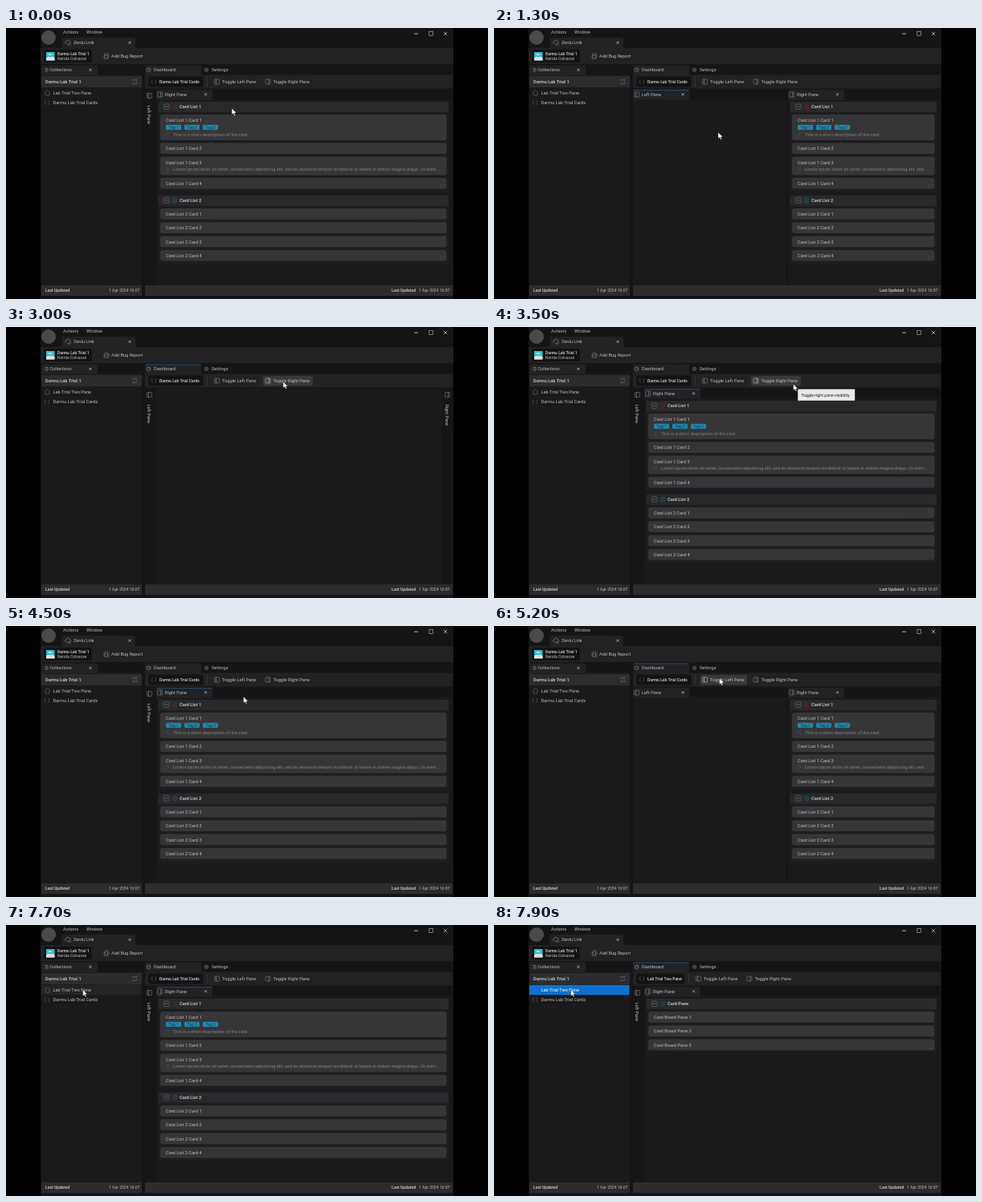
An HTML page for the animation above (8000 ms loop, 600 by 338 pixels).

```html
<!DOCTYPE html>
<html lang="en">
<head>
<meta charset="utf-8">
<title>Pane toggles</title>
<style>
  html, body { margin: 0; width: 100%; height: 100%; overflow: hidden; background: #000; }
  svg { display: block; width: 100vw; height: 100vh; }
  text { font-family: Roboto, "Liberation Sans", sans-serif; white-space: pre; }
</style>
</head>
<body>
<svg id="stage" viewBox="0 0 600 338"></svg>
<script>
const LOOP = 8000, STEP = 100;
const stage = document.getElementById('stage');
const C = {
  frame: '#151516', bar: '#222224', body: '#1a191b', head: '#2c2c2e', card: '#363638',
  hover: '#39393b', ink: '#bcbcbc', dim: '#828284', icon: '#7c7c7e', faint: '#4c4c4e',
  field: '#131314', blue: '#0f70d0', focus: '#20527e'
};
const PROJECT = 'Darmu Lab Trial 1', CARDS = 'Darmu Lab Trial Cards', TWO_PANE = 'Lab Trial Two Pane';
const LOREM = 'Lorem ipsum dolor sit amet, consectetur adipiscing elit, sed';

// [time, layout, focused tab]
const STATES = [
  [0, 'right', ''], [300, 'both', 'dashboard'], [600, 'both', 'left'], [2500, 'right', ''],
  [2900, 'none', 'dashboard'], [3100, 'right', 'dashboard'], [3200, 'right', 'right'],
  [4800, 'both', 'dashboard'], [5400, 'right', ''],
  [6700, 'folded', 'right'], [7000, 'right', 'right'], [7900, 'board', 'dashboard']
];
// [time, x, y] of the pointer tip
const PATH = [
  [0, 281, 100], [200, 283, 68], [300, 283, 68], [500, 270, 190], [800, 262, 288], [900, 262, 284],
  [1000, 258, 270], [1200, 212, 150], [1400, 346, 110], [1600, 310, 46], [1800, 288.5, 67],
  [2500, 288.5, 67], [2800, 345, 68], [3100, 345, 68], [3200, 372, 110], [3400, 372.5, 71],
  [3700, 372.5, 71], [3900, 470, 150], [4100, 542, 222], [4400, 310, 110], [4600, 281, 66],
  [5200, 280.5, 65], [5400, 280.5, 65], [5700, 346, 150], [5900, 300, 208], [6200, 140, 120],
  [6400, 88, 84], [6700, 199, 97], [7000, 199, 97], [7400, 95.5, 80.5], [8000, 95.5, 80.5]
];

const rect = (x, y, w, h, fill, r = 0, stroke = 'none') =>
  `<rect x="${x}" y="${y}" width="${w}" height="${h}" rx="${r}" fill="${fill}" stroke="${stroke}" stroke-width=".6"/>`;
const line = (d, color = C.icon, w = .8) =>
  `<path d="${d}" fill="none" stroke="${color}" stroke-width="${w}"/>`;
const circle = (x, y, r, fill, stroke = 'none') =>
  `<circle cx="${x}" cy="${y}" r="${r}" fill="${fill}" stroke="${stroke}" stroke-width=".8"/>`;
// y is the middle of the line
const label = (s, x, y, { size = 5.65, color = C.ink, bold = false } = {}) =>
  `<text x="${x}" y="${y + 2}" font-size="${size}" fill="${color}" font-weight="${bold ? 700 : 400}">${s}</text>`;
const cross = (x, y, r = 1.4) =>
  line(`M${x - r} ${y - r}l${2 * r} ${2 * r}m0 ${-2 * r}l${-2 * r} ${2 * r}`, C.ink, .8);
const paneIcon = (x, y, split, color = C.icon) =>
  rect(x, y - 3, 6, 6, 'none', .7, color) + line(`M${x + split} ${y - 3}v6`, color);
const rowIcon = (x, y) => line(`M${x - 1} ${y - 2}h-1.5v4h1.5m2 -4h1.5v4h-1.5`, C.faint, .7);

function at(time) {
  const i = PATH.findIndex(p => p[0] > time);
  const [a, x0, y0] = PATH[i - 1], [b, x1, y1] = PATH[i];
  const u = (time - a) / (b - a), e = u * u * (3 - 2 * u);
  return { x: x0 + (x1 - x0) * e, y: y0 + (y1 - y0) * e };
}

function tab(name, x, y, focused, icon) {
  return rect(x, y, 70, 12.5, C.bar, 1.5) + icon + label(name, x + 11, y + 5.8)
    + (focused ? rect(x + .5, y, 69, .9, C.focus) : '');
}

function titleBar() {
  return rect(43, 0, 514, 338, C.frame) + circle(53, 12, 9, '#4a4a4a')
    + label('Actions', 71, 4.8) + label('Window', 100, 4.8)
    + rect(69.5, 12, 91.5, 14, C.bar, 2) + rect(43, 25, 514, 20, C.bar)
    + line('M74 20v-3l3-2 3 2v4h-3v-2') + label('Zenlu Link', 84, 18.3) + cross(154, 18.3)
    + line('M508 7.2h5', C.ink, .9) + rect(526.8, 4.6, 4.8, 4.8, 'none', 0, C.ink) + cross(547, 7, 2.2)
    + rect(47, 27, 60, 16, C.field, 2)
    + rect(50, 30, 10.5, 10.5, '#35bccb') + '<path d="M50 40.5v-3q3-3 5-1l3-1 2.5 2v3z" fill="#e5ded8"/>'
    + rect(52.5, 32, 5, 2, '#9be7e8', 1)
    + label(PROJECT, 64, 31.8, { size: 5, bold: true }) + label('Nerida Colvasse', 64, 38, { size: 5 })
    + `<ellipse cx="125" cy="35.5" rx="1.8" ry="2.8" fill="none" stroke="${C.icon}" stroke-width=".8"/>`
    + line('M121.5 33.5l2 .8m3 0l2-.8M121 36h2m4 0h2M122 39l1.5-1m3 0l1.5 1M124 32l-1-1m3 1l1-1')
    + label('Add Bug Report', 131, 35);
}

function footer(x, w, textX, dateX) {
  return rect(x, 321, w, 13, C.head) + label('Last Updated', textX, 327, { size: 5.05, bold: true })
    + label('1 Apr 2024 16:07', dateX, 327, { size: 5.05 });
}

function collections(p, selected) {
  const row = (name, y, chosen) => {
    const over = p.x > 44 && p.x < 168 && Math.abs(p.y - y) < 6;
    const fill = chosen ? C.blue : over ? '#242426' : 'none';
    return rect(44, y - 6.2, 124.5, 12.4, fill) + label(name, 58.5, y, { color: chosen ? '#fff' : C.ink });
  };
  return rect(44, 58, 125, 263, C.body) + rect(44, 46.5, 70, 12.5, C.bar, 1.5)
    + line('M48.5 50.5h4m-4 1.8h5m-5 1.8h4') + label('Collections', 54.5, 52.3, { size: 5.5 }) + cross(105, 52.3)
    + rect(44, 60, 125, 14, C.head) + label(PROJECT, 49, 67, { bold: true })
    + line('M157.5 66v-1.2h5M163 67.5v1.8h-5M161.5 63.3l1.5 1.5-1.5 1.5M159 67.8l-1.5 1.5 1.5 1.5', '#69696b', .7)
    + row(TWO_PANE, 81, selected) + row(CARDS, 93.2, false)
    + (selected ? '' : line('M49 80v4h5v-4m-5.5 0l3-2.5 3 2.5', '#606062', .7)) + rowIcon(51, 93.2)
    + footer(44, 125, 49, 128);
}

function toolbar(p, board, focus) {
  const dx = board ? -8 : 0;
  const button = (name, x, w, split) => {
    const over = p.y > 60 && p.y < 73.5 && p.x > x && p.x < x + w;
    return (over ? rect(x, 61, w, 12.5, C.hover, 2) : '')
      + paneIcon(x + 3, 67, split, over ? C.ink : C.icon) + label(name, x + 12.5, 67);
  };
  return tab('Dashboard', 173, 46.5, focus === 'dashboard',
      circle(177.5, 52.3, 2.2, 'none', C.icon) + line('M177.5 52.3l1.5-1.5'))
    + circle(249.5, 52.3, 2, 'none', C.icon) + circle(249.5, 52.3, .7, C.icon) + label('Settings', 256, 52.3)
    + rect(173, 58.5, 383, 17, C.bar)
    + rect(177.5, 60.5, 68 + dx, 13, C.field, 2) + rowIcon(184, 67)
    + label(board ? TWO_PANE : CARDS, 191, 67, { size: 5, bold: true })
    + line(`M${250.5 + dx} 61v12`, '#3b3b3d', .7)
    + button('Toggle Left Pane', 256.5 + dx, 58.5, 2) + button('Toggle Right Pane', 320 + dx, 62, 4);
}

function sidebar(name, x, split) {
  return rect(x - 5, 77, 13, 244, '#161617') + paneIcon(x - 2.5, 84.5, split)
    + `<g transform="translate(${x},96.5) rotate(90)">${label(name, 0, 0, { size: 5.5 })}</g>`;
}

function listHead(name, x, y, color, folded) {
  return rect(x, y, 551 - x, 13, '#29292b')
    + rect(x + 6.5, y + 3, 6.5, 6.5, 'none', 1, '#6c6c6e')
    + line(`M${x + 8} ${y + 6.2}h3.5` + (folded ? 'm-1.75-1.75v3.5' : ''), C.dim, .7)
    + rect(x + 18, y + 3.9, 4.5, 4.8, 'none', .5, color) + line(`M${x + 19} ${y + 5.5}h2.5m-2.5 1.7h2.5`, color, .5)
    + label(name, x + 26, y + 6.3, { bold: true });
}

function card(name, x, y, h = 13.7, note = '') {
  const noteIcon = line(`M${x + 9} ${y + h - 9.2}h4m-4 1.8h4m-4 1.8h4`, C.faint, .6);
  return rect(x + 2, y, 546.4 - x, h, C.card, 2.5) + label(name, x + 9, y + 7)
    + (note ? noteIcon + label(note, x + 18, y + h - 7.3, { size: 5.6, color: C.dim }) : '');
}

const tags = (x, y) => [1, 2, 3].map((n, i) =>
  rect(x + 9 + i * 23, y, 19, 6.2, '#2086ab', 1.3)
  + label('Tag ' + n, x + 12.5 + i * 23, y + 3.1, { size: 5, color: '#123d4e' })).join('');

function rightPane(x, layout, focus) {
  const wide = layout !== 'both', folded = layout === 'folded', left = x + 3;
  let out = rect(x, 89, 556 - x, 232, C.body)
    + tab('Right Pane', x, 77, focus === 'right', paneIcon(x + 1.7, 83, 4)) + cross(x + 61.5, 82.8);
  if (layout === 'board') {
    out += rect(left, 92, 551 - left, 66, '#1e1d1f') + listHead('Card Pane', left, 92, '#1a5f70');
    return out + [1, 2, 3].map(n => card('Card Board Pane ' + n, left, 90.7 + 17.3 * n)).join('');
  }
  out += rect(left, 92, 551 - left, folded ? 13 : 112, '#1e1d1f')
    + listHead('Card List 1', left, 92, '#7c2129', folded);
  if (!folded) {
    const more = wide ? ' do eiusmod tempor incididunt ut labore et dolore magna aliqua. Ut enim...' : '...';
    out += card('Card List 1 Card 1', left, 108, 32, 'This is a short description of the card')
      + tags(left, 120.7) + card('Card List 1 Card 2', left, 143.3)
      + card('Card List 1 Card 3', left, 160.5, 23, LOREM + more)
      + card('Card List 1 Card 4', left, 186.7);
  }
  const top = folded ? 109.5 : 208.7;
  out += rect(left, top, 551 - left, 85.5, '#1e1d1f') + listHead('Card List 2', left, top, '#1a6685');
  for (let n = 1; n <= 4; n++) out += card('Card List 2 Card ' + n, left, top - 1 + 17.3 * n);
  return out;
}

function panes(layout, focus) {
  if (layout === 'both') {
    return rect(173, 89, 191, 232, C.body)
      + tab('Left Pane', 173, 77, focus === 'left', paneIcon(174.7, 83, 2)) + cross(235, 82.8)
      + rightPane(366, layout, focus);
  }
  return sidebar('Left Pane', 178, 2)
    + (layout === 'none' ? rect(186, 77, 357, 244, C.body) + sidebar('Right Pane', 549, 4)
                         : rightPane(187, layout, focus));
}

function tooltip(time, p) {
  const first = time >= 1900 && time < 2500, second = time >= 3500 && time < 3800;
  if (!first && !second) return '';
  const x = p.x + 5.7;
  return rect(x, 77.5, first ? 67 : 71, 14.3, '#e9e9e9')
    + label(`Toggle ${first ? 'left' : 'right'} pane visibility`, x + 4, 84.7, { size: 5.25, color: '#1c1c1c' });
}

const pointer = p =>
  `<path transform="translate(${p.x},${p.y})" d="M0 0V8.2L1.9 6.5 3.2 9.3 4.6 8.7 3.4 6H6Z" fill="#fff" stroke="#111" stroke-width=".5"/>`;

function scene(time) {
  const [, layout, focus] = STATES.filter(s => s[0] <= time).pop();
  const p = at(time), board = layout === 'board';
  return titleBar() + collections(p, board) + toolbar(p, board, focus) + panes(layout, focus)
    + footer(173, 383, 480, 514) + tooltip(time, p) + pointer(p);
}

let shown = -1;
function tick() {
  const time = Math.floor(performance.now() % LOOP / STEP) * STEP;
  if (time !== shown) stage.innerHTML = scene(shown = time);
  requestAnimationFrame(tick);
}
tick();
</script>
</body>
</html>
```
